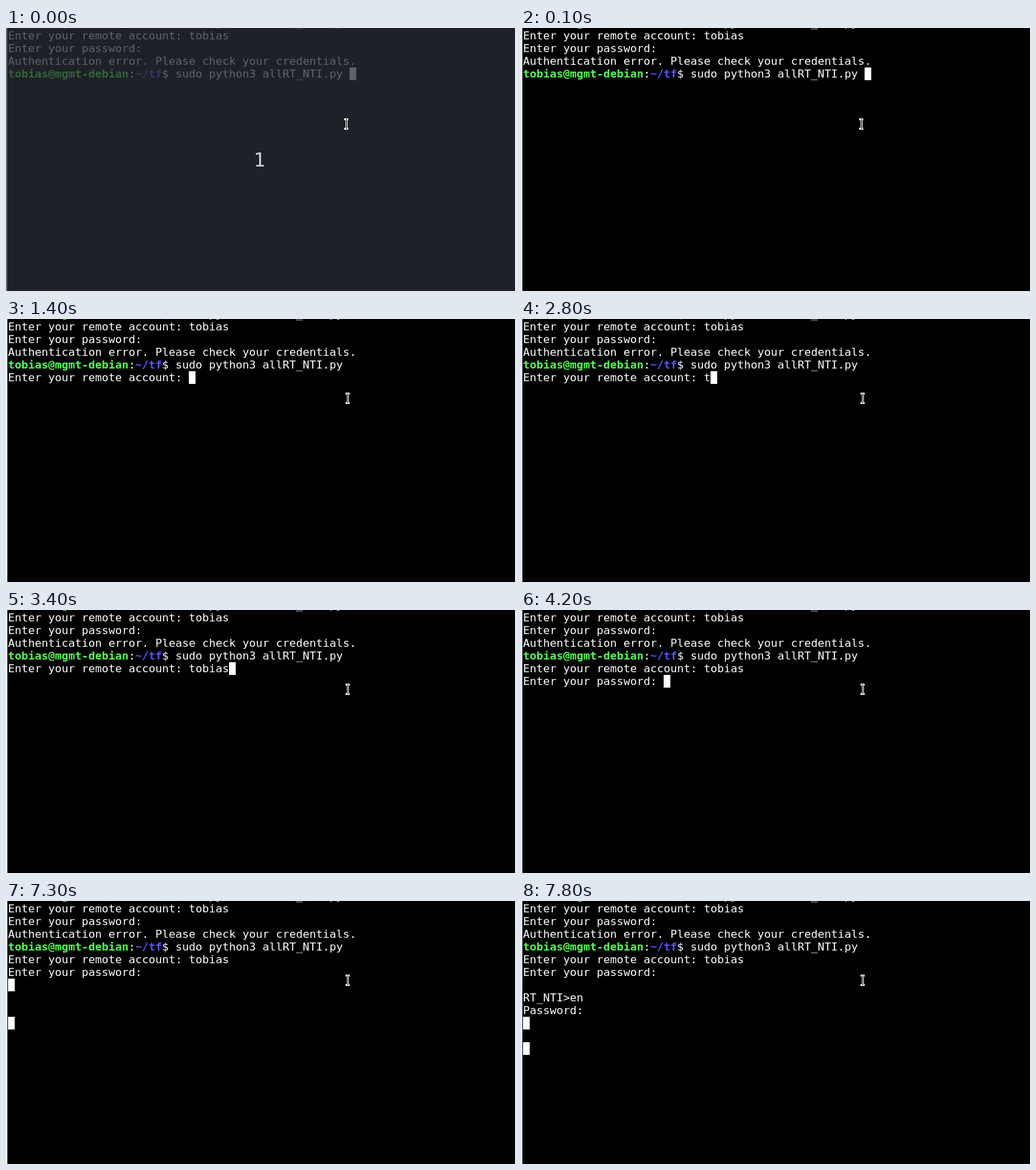
These frames come from a looping animation (760 px wide and 393 px high, 8 s). An HTML page with a canvas:

```html
<!DOCTYPE html>
<html lang="en">
<meta charset="utf-8">
<style>
html, body { margin: 0; width: 100%; height: 100%; overflow: hidden; background: #000; }
canvas { display: block; }
</style>
<canvas id="stage" width="760" height="393"></canvas>
<script>
const ctx = document.getElementById('stage').getContext('2d');
const LOOP = 8000, COL = 10, ROW = 19, LEFT = 3, TOP = 2;
const WHITE = '#fff', FONT = '16.61px "DejaVu Sans Mono", monospace';
const USER = 'tobias';
const ACCOUNT = 'Enter your remote account: ', PASSWORD = 'Enter your password: ';
// time at which each number of typed characters appears
const KEYS = [[2800, 1], [2900, 2], [3000, 4], [3200, 5], [3400, 6]];

function rect(color, x, y, w, h) {
  ctx.fillStyle = color;
  ctx.fillRect(x, y, w, h);
}

function print(row, col, text, color = WHITE, weight = '') {
  ctx.font = weight + ' ' + FONT;
  ctx.fillStyle = color;
  ctx.fillText(text, LEFT + col * COL, TOP + row * ROW + 15);
}

function block(row, col) {
  rect(WHITE, LEFT + col * COL, TOP + row * ROW, COL, ROW);
}

function command(row) {
  const host = USER + '@mgmt-debian';
  print(row, 0, host, '#54ff54', 'bold');
  print(row, 18, ':');
  print(row, 19, '~/tf', '#5454ff', 'bold');
  print(row, 23, '$ sudo python3 allRT_NTI.py');
}

function pointer(x, y) {
  rect(WHITE, x - 3, y - 8, 6, 3);
  rect(WHITE, x - 3, y + 6, 6, 3);
  rect(WHITE, x - 1, y - 7, 3, 15);
  rect('#000', x, y - 7, 1, 15);
}

function terminal(t) {
  rect('#000', 0, 0, 760, 393);
  rect(WHITE, 0, 0, 2, 393);
  command(-1);
  print(0, 0, ACCOUNT + USER);
  print(1, 0, PASSWORD);
  print(2, 0, 'Authentication error. Please check your credentials.');
  command(3);

  const during = (from, to) => t >= from && t < to;
  if (t < 1000) block(3, 51);
  if (during(900, 1400)) block(4, 0);
  if (t >= 1400) {
    let typed = 0;
    for (const [at, count] of KEYS) if (t >= at) typed = count;
    print(4, 0, ACCOUNT + USER.slice(0, typed));
    if (t < 4200) block(4, 27 + typed);
  }
  if (t >= 4200) print(5, 0, PASSWORD);
  if (during(4200, 6500)) block(5, 21);
  if (during(6300, 7500)) block(6, 0);
  if (t >= 7300) block(9, 0);
  if (t >= 7500) {
    print(7, 0, 'RT_NTI>en');
    print(8, 0, 'Password:');
  }
  if (t >= 7800) block(11, 0);
}

function countdown() {
  rect('rgba(41, 44, 53, 0.75)', 0, 0, 760, 393);
  ctx.font = '28px "DejaVu Sans", sans-serif';
  ctx.fillStyle = '#d3d3df';
  ctx.fillText('1', 370, 207);
}

function draw(now) {
  const t = now % LOOP;
  terminal(t);
  if (t < 100) countdown();
  if (t < 200) pointer(508, 143);
  else pointer(510, 118);
}

const start = performance.now();
function tick() {
  draw(performance.now() - start);
  requestAnimationFrame(tick);
}
tick();
</script>
</html>
```
